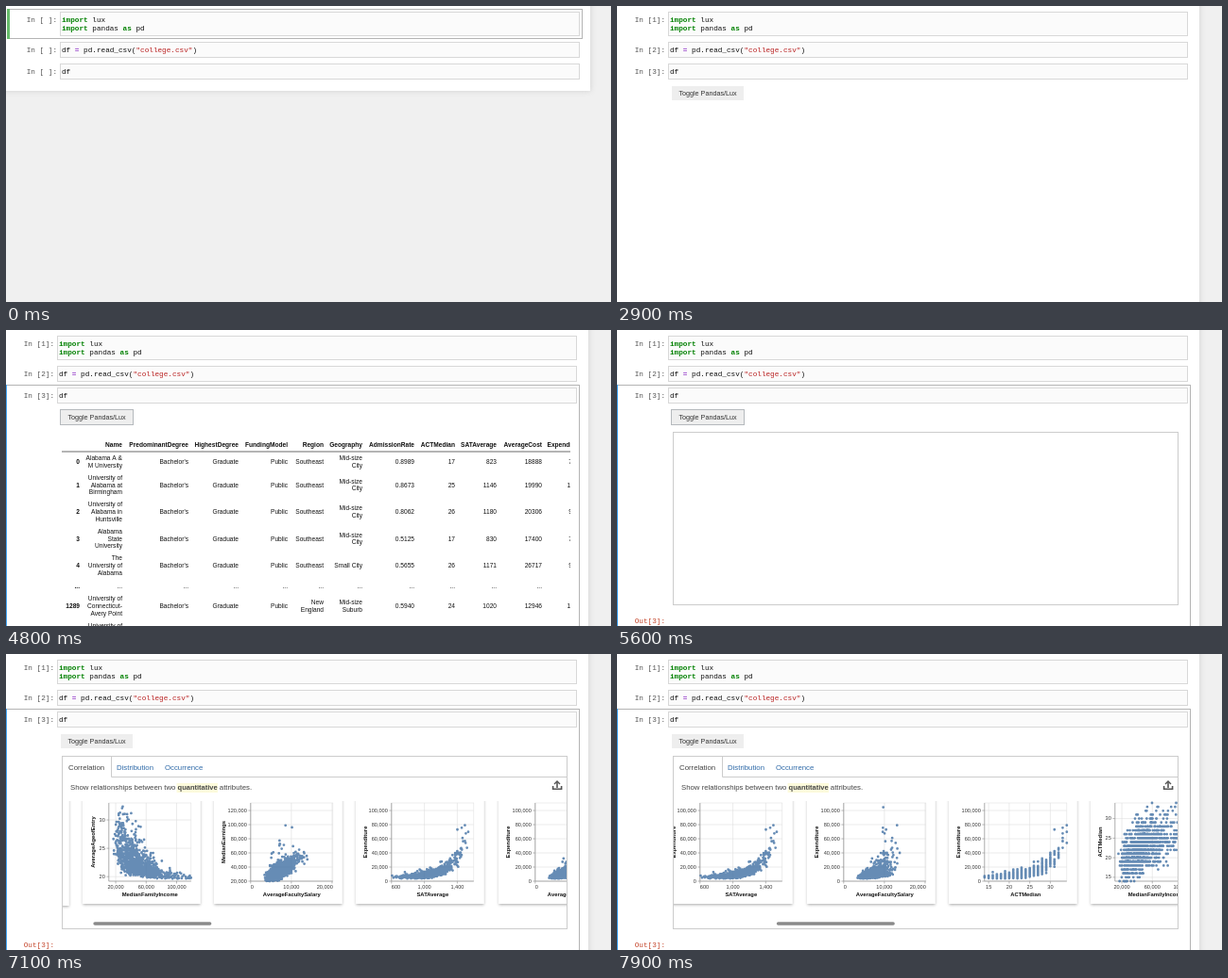
An HTML page with a canvas for the animation above (8 s loop, 640 by 314 pixels).

```html
<!DOCTYPE html>
<html lang="en">
<head>
<meta charset="utf-8">
<title>Notebook</title>
<style>
  html, body { margin: 0; height: 100%; overflow: hidden; background: #f0f0f0; }
  canvas { display: block; width: 640px; height: 314px; }
</style>
</head>
<body>
<canvas id="stage"></canvas>
<script>
const W = 640, H = 314, LOOP = 8000;
const SANS = '"Liberation Sans", Arial, sans-serif';
const MONO = '"Liberation Mono", "Courier New", monospace';
const canvas = document.getElementById('stage');
const g = canvas.getContext('2d');
const dpr = window.devicePixelRatio || 1;
canvas.width = W * dpr;
canvas.height = H * dpr;

// ---------- drawing helpers ----------
function text(str, x, y, { size = 6.6, color = '#111', align = 'left', bold = false, family = SANS } = {}) {
  g.font = `${bold ? 'bold ' : ''}${size}px ${family}`;
  g.fillStyle = color;
  g.textAlign = align;
  g.textBaseline = 'middle';
  g.fillText(str, x, y);
  return x + g.measureText(str).width;
}

function box(x, y, w, h, fill, stroke) {
  if (fill) { g.fillStyle = fill; g.fillRect(x, y, w, h); }
  if (stroke) { g.strokeStyle = stroke; g.lineWidth = 1; g.strokeRect(x + .5, y + .5, w - 1, h - 1); }
}

function line(color, width, ...pts) {
  g.strokeStyle = color;
  g.lineWidth = width;
  g.beginPath();
  for (let i = 0; i < pts.length; i += 2) g.lineTo(pts[i], pts[i + 1]);
  g.stroke();
}

function shadow(color, blur, dy, draw) {
  g.save();
  g.shadowColor = color;
  g.shadowBlur = blur * dpr;
  g.shadowOffsetY = dy * dpr;
  draw();
  g.restore();
}

function clipped(x, y, w, h, draw) {
  g.save();
  g.beginPath();
  g.rect(x, y, w, h);
  g.clip();
  draw();
  g.restore();
}

// ---------- notebook cells ----------
const KEY = { color: '#008000', bold: true }, OP = { color: '#94c', bold: true }, STR = { color: '#ba2121' };
const CODE = [
  [[['import', KEY], [' lux']], [['import', KEY], [' pandas '], ['as', KEY], [' pd']]],
  [[['df '], ['=', OP], [' pd.read_csv('], ['"college.csv"', STR], [')']]],
  [[['df']]],
  []
];

function prompt(str, y, color = '#555') {
  text(str, 54, y, { size: 7.7, color, align: 'right', family: MONO });
}

function cell(i, mark, y) {
  box(57, y - 9, 550, i ? 17 : 26, '#fbfbfb', '#d8d8d8');
  prompt(`In [${mark}]:`, y);
  CODE[i].forEach((tokens, row) => {
    let x = 59;
    for (const [str, style] of tokens) x = text(str, x, y + row * 9, { size: 7.7, family: MONO, ...style });
  });
}

function selection(top, bottom, color) {
  box(1, top, 609, bottom - top, null, '#b4b4b4');
  box(1, top, 3, bottom - top, color);
}

// ---------- table output ----------
const EDGES = [78, 123, 193, 246, 298, 336, 377, 432, 475, 519, 567];
const HEAD = ['', 'Name', 'PredominantDegree', 'HighestDegree', 'FundingModel', 'Region', 'Geography',
  'AdmissionRate', 'ACTMedian', 'SATAverage', 'AverageCost'];
const college = (id, name, region, place, ...rest) =>
  [id, name, "Bachelor's", 'Graduate', 'Public', region, place, ...rest];
const ROWS = [
  college('0', 'Alabama A &|M University', 'Southeast', 'Mid-size|City', '0.8989', '17', '823', '18888', ' 7'),
  college('1', 'University of|Alabama at|Birmingham', 'Southeast', 'Mid-size|City', '0.8673', '25', '1146', '19990', '1'),
  college('2', 'University of|Alabama in|Huntsville', 'Southeast', 'Mid-size|City', '0.8062', '26', '1180', '20306', ' 9'),
  college('3', 'Alabama|State|University', 'Southeast', 'Mid-size|City', '0.5125', '17', '830', '17400', ' 7'),
  college('4', 'The|University of|Alabama', 'Southeast', 'Small City', '0.5655', '26', '1171', '26717', ' 9'),
  Array(11).fill('...'),
  college('1289', 'University of|Connecticut-|Avery Point', 'New|England', 'Mid-size|Suburb', '0.5940', '24', '1020', '12946', '1'),
  ['', 'University of|Connecticut-|Stamford']
];
const ROW_HEIGHTS = [21, 28.5, 28.5, 28.5, 28.5, 14.5, 28.5, 28.5];

function table(hovered) {
  clipped(59, 108, 538, 206, () => {
    HEAD.forEach((name, i) => text(name, EDGES[i], 122, { bold: true, align: 'right' }));
    text('Expenditure', 572.5, 122, { bold: true });
    let top = 129.5;
    ROWS.forEach((row, r) => {
      const h = ROW_HEIGHTS[r], mid = top + h / 2;
      if (r === hovered) box(59, top, 538, h, '#e3f2fd');
      row.forEach((value, c) => {
        if (c > 10) return text(value, 593.5, mid);
        const lines = value.split('|');
        lines.forEach((s, k) => text(s, EDGES[c], mid + (k - (lines.length - 1) / 2) * 7.7,
          { align: 'right', bold: c === 0 }));
      });
      top += h;
    });
    line('#444', .8, 59, 129, 597, 129);
  });
}

// ---------- chart data ----------
let seed = 11;
function random() {
  seed = (seed * 1664525 + 1013904223) % 4294967296;
  return (seed + .5) / 4294967296;
}
const normal = () => Math.sqrt(-2 * Math.log(random())) * Math.cos(2 * Math.PI * random());

function school() {
  const q = normal();
  const act = Math.round(22.6 + 3.5 * q + .5 * Math.max(0, q) ** 2);
  const sat = 1056 + (act - 23) * 42 + 24 * normal() + (random() < .02 ? 90 : 0);
  const income = 46 * Math.exp(.38 * (.5 * q + .87 * normal()));
  const salary = 7000 * Math.exp(.25 * (.8 * q + .6 * normal()));
  const rich = random() < .008 ? 1.9 : 1;
  return {
    ACTMedian: act,
    SATAverage: sat,
    MedianFamilyIncome: income * 1000,
    AverageFacultySalary: salary,
    AverageAgeofEntry: 19.4 + 6.5 * Math.exp((20 - income) / 32) * Math.exp(.55 * normal()),
    MedianEarnings: (10000 + 3.5 * salary + 5500 * normal()) * rich,
    Expenditure: (5500 + 2500 * Math.exp((sat - 1000) / 165)) * Math.exp(.24 * normal()) * rich
  };
}
const SCHOOLS = Array.from({ length: 1100 }, school);

// domain low, domain high, first tick, step, step on a horizontal axis
const AXES = {
  ACTMedian: [14, 34, 15, 5],
  SATAverage: [600, 1600, 600, 200, 400],
  MedianFamilyIncome: [11000, 119000, 20000, 40000],
  AverageFacultySalary: [0, 20200, 0, 10000],
  AverageAgeofEntry: [19.2, 33, 20, 5],
  MedianEarnings: [20000, 130700, 20000, 20000],
  Expenditure: [0, 110700, 0, 20000]
};
const PLOT_W = 87, PLOT_H = 83;

// card left, card width, plot left, vertical title x, horizontal and vertical attribute
const CHARTS = [
  [68, 130, 101, 79, 'ACTMedian', 'SATAverage'],
  [212, 125, 240, 224, 'MedianFamilyIncome', 'AverageAgeofEntry'],
  [351, 136, 390, 362, 'AverageFacultySalary', 'MedianEarnings'],
  [501, 136, 539, 512, 'SATAverage', 'Expenditure'],
  [652, 136, 691, 663, 'AverageFacultySalary', 'Expenditure'],
  [802, 136, 840, 813, 'ACTMedian', 'Expenditure'],
  [952, 136, 978, 963, 'MedianFamilyIncome', 'ACTMedian']
].map(([left, width, x0, titleX, xName, yName], i) => {
  const y0 = i ? 241 : 243;
  const part = (name, v) => (v - AXES[name][0]) / (AXES[name][1] - AXES[name][0]);
  const px = v => x0 + part(xName, v) * PLOT_W;
  const py = v => y0 - part(yName, v) * PLOT_H;
  const dots = new Path2D();
  for (const s of SCHOOLS) {
    const x = px(s[xName]), y = py(s[yName]);
    if (x < x0 || x > x0 + PLOT_W || y > y0 || y < y0 - PLOT_H) continue;
    dots.moveTo(x + 1.4, y);
    dots.arc(x, y, 1.4, 0, 7);
  }
  return { left, width, x0, y0, titleX, xName, yName, px, py, dots };
});

function ticks(name, horizontal) {
  const [, hi, first, step, wide] = AXES[name], list = [];
  for (let v = first; v <= hi; v += horizontal && wide || step) list.push(v);
  return list;
}

function chart({ left, width, x0, y0, titleX, xName, yName, px, py, dots }) {
  const x1 = x0 + PLOT_W, y1 = y0 - PLOT_H;
  const label = { size: 5.6, color: '#333' }, title = { size: 5.85, bold: true, align: 'center' };
  shadow('rgba(0,0,0,.35)', 3, 1, () => box(left, 140, width, y0 - 116, '#fff'));
  g.strokeStyle = '#e0e0e0';
  g.lineWidth = .6;
  g.strokeRect(x0, y1, PLOT_W, PLOT_H);
  for (const v of ticks(xName, true)) {
    const x = px(v);
    line('#ddd', .6, x, y1, x, y0);
    line('#888', .6, x, y0, x, y0 + 2.5);
    const atStart = x < x0 + 1, atEnd = x > x1 - 3;
    text(v.toLocaleString('en-US'), atEnd ? x1 : x, y0 + 6.5,
      { ...label, align: atStart ? 'left' : atEnd ? 'right' : 'center' });
  }
  for (const v of ticks(yName)) {
    const y = py(v);
    line('#ddd', .6, x0, y, x1, y);
    line('#888', .6, x0 - 2.5, y, x0, y);
    text(v.toLocaleString('en-US'), x0 - 4, y, { ...label, align: 'right' });
  }
  line('#888', .6, x0, y1, x0, y0, x1, y0);
  g.fillStyle = 'rgba(76,120,168,.85)';
  g.fill(dots);
  text(xName, x0 + PLOT_W / 2, y0 + 14.3, title);
  g.save();
  g.translate(titleX, (y0 + y1) / 2);
  g.rotate(-Math.PI / 2);
  text(yName, 0, 0, title);
  g.restore();
}

// ---------- chart output ----------
function widget(scroll, ready) {
  box(59, 108, 535, 184, '#fff', '#ccc');
  if (!ready) return;
  line('#ccc', 1, 111.5, 109, 111.5, 130.5, 594, 130.5);
  const font = { size: 7.8 };
  text('Correlation', 66, 120.5, { ...font, color: '#444' });
  text('Distribution', 117, 120.5, { ...font, color: '#2f6aa8' });
  text('Occurrence', 168, 120.5, { ...font, color: '#2f6aa8' });

  let x = text('Show relationships between two ', 68, 142, { ...font, color: '#444' });
  box(x - 1, 137, 43.5, 10, '#fdfbdc');
  x = text('quantitative', x, 142, { size: 7.5, bold: true, color: '#444' });
  text(' attributes.', x, 142, { ...font, color: '#444' });

  line('#555', 1.6, 583, 142, 583, 136);
  line('#555', 1.4, 580, 138, 583, 135, 586, 138);
  line('#555', 1.6, 578.6, 140, 578.6, 143.2, 587.6, 143.2, 587.6, 140);

  clipped(60, 156, 533, 115, () => {
    g.translate(-scroll, 0);
    for (const c of CHARTS) if (c.left - scroll < 600 && c.left + c.width - scroll > 55) chart(c);
  });

  if (!scroll) {
    text('Scroll for 12 more charts', 475, 276.5, { size: 7.6, bold: true, color: '#555' });
    for (const cx of [580, 584]) line('#555', 1, cx, 273, cx + 3.5, 276.5, cx, 280);
  }
  g.fillStyle = '#8a8a8a';
  g.beginPath();
  g.roundRect(61 + scroll * .239, 284.3, 125, 3.4, 1.7);
  g.fill();
}

function button(hovered) {
  if (hovered) box(57, 84, 78, 17, '#eee', '#b5b9bd');
  else box(58, 85, 76, 15, '#eee');
  text('Toggle Pandas/Lux', 96, 92.7, { size: 7.2, color: '#333', align: 'center' });
}

// ---------- timeline ----------
function draw(t) {
  const between = (a, b) => t >= a && t < b;
  const cleared = between(4900, 5600);
  const tall = t >= 2900 && !cleared;
  const bottom = tall ? H + 20 : cleared ? 161 : t < 1400 ? 90 : 113;
  const scroll = Math.max(0, .4 * (t - 6772));

  g.setTransform(dpr, 0, 0, dpr, 0, 0);
  box(0, 0, W, H, '#f0f0f0');
  shadow('rgba(87,87,87,.22)', 6, 0, () => box(-20, -20, (tall ? 616 : 618) + 20, bottom + 20, '#fff'));
  if (tall) g.translate(-3, 0);

  const green = '#66bb6a', blue = '#42a5f5';
  if (t < 800) selection(3, 35, green);
  else if (t < 1100) selection(36, 59, blue);
  else if (t < 1400) selection(59, 82, blue);
  else if (t < 2900) selection(82, 104, green);
  else if (t >= 4200) selection(58, cleared ? 129 : H + 20, blue);

  cell(0, t < 800 ? ' ' : t < 1400 ? '*' : 1, 15);
  cell(1, t < 1100 ? ' ' : t < 1400 ? '*' : 2, 47);
  cell(2, t < 1400 ? ' ' : t < 2900 ? '*' : 3, 70);
  if (between(1400, 2900)) cell(3, ' ', 93);
  if (cleared) cell(3, ' ', 141);

  if (between(600, 800)) box(105, 10, 1, 10, '#333');
  if (between(1400, 1900) || between(2500, 2900)) box(59.5, 88, 1, 10, '#333');

  if (t < 2900) return;
  if (t >= 4900) prompt('Out[3]:', cleared ? 117 : 309, '#c4452a');
  g.translate(3, 0);
  button(between(3900, 6800));
  if (between(3000, 4900)) {
    table(between(3100, 3300) ? 3 : between(3300, 3400) ? 1 : between(3400, 3600) ? 0 : -1);
  }
  if (t >= 5600) widget(scroll, t >= 5800);
}

function tick() {
  const t = performance.now() % LOOP;
  draw(Math.floor(t / 100) * 100);
  requestAnimationFrame(tick);
}
tick();
</script>
</body>
</html>
```
